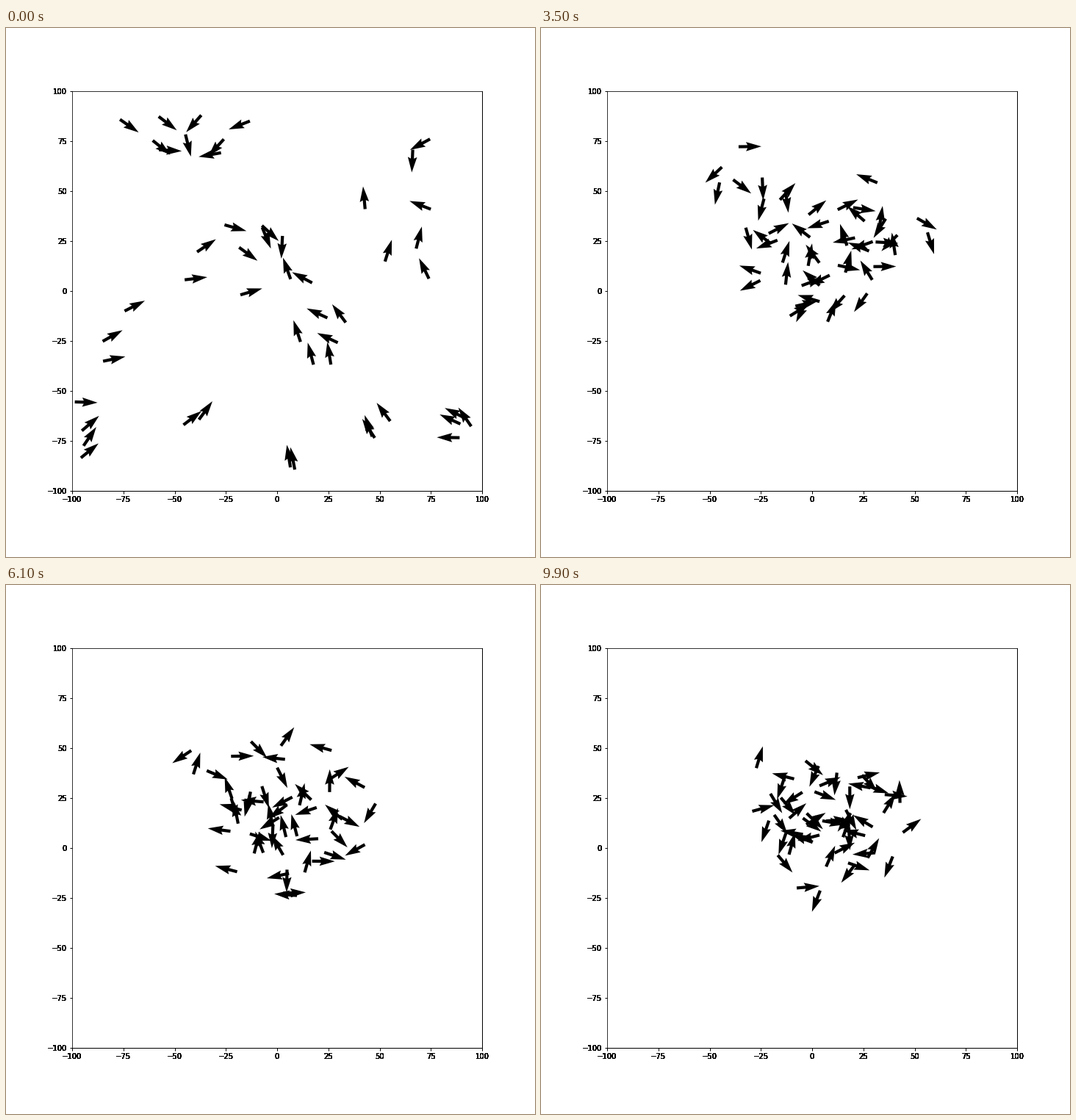
A matplotlib script that plays this animation: 720 px wide and 720 px high, repeating every 10000 ms.

```python
import numpy as np
import matplotlib.pyplot as plt
from matplotlib.animation import FuncAnimation

FRAMES, INTERVAL = 100, 100
SPEED, REACH = 3.2, 36
CENTRE = np.array([7, 11])
LABEL_COPIES = 12

# Where the arrows start: middle, half size, count
LEFT_FLOCK = (-45, 77), (32, 14), 9
RIGHT_FLOCK = (68, 40), (27, 37), 7
LONERS = [
    ((-8, 18), (38, 20), 10),
    ((22, -20), (12, 24), 6),
    ((90, -54), (5, 24), 4),
    ((0, -78), (62, 16), 7),
    ((-95, -72), (4, 22), 4),
    ((-68, -20), (18, 20), 3),
]

rng = np.random.default_rng(7)


def norm(v):
    return np.linalg.norm(v, axis=-1, keepdims=True)


def unit(v):
    return v / np.maximum(norm(v), 1e-9)


def scatter(middle, half, count):
    return middle + rng.uniform(-1, 1, (count, 2)) * half


def separation(pos, radius=12, weight=0.75):
    away = pos[:, None] - pos
    dist = norm(away)
    push = np.where(dist < radius, 1 - dist / radius, 0)
    return weight * (unit(away) * push).sum(axis=1)


def fly():
    """Positions and headings of the whole swarm for every frame."""
    groups = [LEFT_FLOCK, RIGHT_FLOCK, *LONERS]
    pos = np.vstack([scatter(*g) for g in groups])
    count = len(pos)

    # The two flocks circle on their own and join the others slowly
    left = np.arange(count) < LEFT_FLOCK[2]
    right = ~left & (np.arange(count) < LEFT_FLOCK[2] + RIGHT_FLOCK[2])
    flock = (left | right)[:, None]
    offset = np.zeros((count, 2))
    offset[left] = -48, 54
    offset[right] = 56, 46
    delay = np.where(left, 60, 38)[:, None]

    vel = unit(unit(CENTRE + offset - pos) + rng.normal(0, 0.4, pos.shape))
    path = []
    for t in range(FRAMES):
        path.append((pos, vel))
        apart = 1 / (1 + (t / delay) ** 2)
        home = CENTRE + offset * apart - pos
        reach = REACH - 18 * flock * apart
        pull = unit(home) * np.minimum((norm(home) / reach) ** 4, 1.5)
        noise = rng.normal(0, 0.25, pos.shape)
        vel = unit(vel + pull + separation(pos) + noise)
        pos = pos + SPEED * vel
    return path


def draw_frame(ax):
    ticks = range(-100, 101, 25)
    ax.set(xlim=(-100, 100), ylim=(-100, 100), xticks=ticks, yticks=ticks)
    ax.tick_params(width=1)
    ax.spines[["right", "bottom"]].set_linewidth(1)

    # Repeated labels add up to heavy, hard-edged text
    x_trans, x_va, x_ha = ax.get_xaxis_text1_transform(7)
    y_trans, y_va, y_ha = ax.get_yaxis_text1_transform(7)
    for t in ticks:
        text = str(t).replace("-", "\u2212")
        for _ in range(LABEL_COPIES):
            ax.text(t, 0, text, transform=x_trans, va=x_va, ha=x_ha)
            ax.text(0, t, text, transform=y_trans, va=y_va, ha=y_ha)


plt.rcParams.update({"font.family": "DejaVu Sans", "font.size": 10})
fig = plt.figure(figsize=(10, 10), dpi=72, facecolor="white")
ax = fig.add_axes([0.125, 0.125, 0.775, 0.755])
draw_frame(ax)

path = fly()
pos, vel = path[0]
arrows = ax.quiver(*pos.T, *vel.T, color="black")


def update(i):
    pos, vel = path[i]
    arrows.set_offsets(pos)
    arrows.set_UVC(*vel.T)
    return arrows,


anim = FuncAnimation(fig, update, frames=FRAMES, interval=INTERVAL,
                     repeat=True, repeat_delay=0, blit=False)
plt.show()
```
